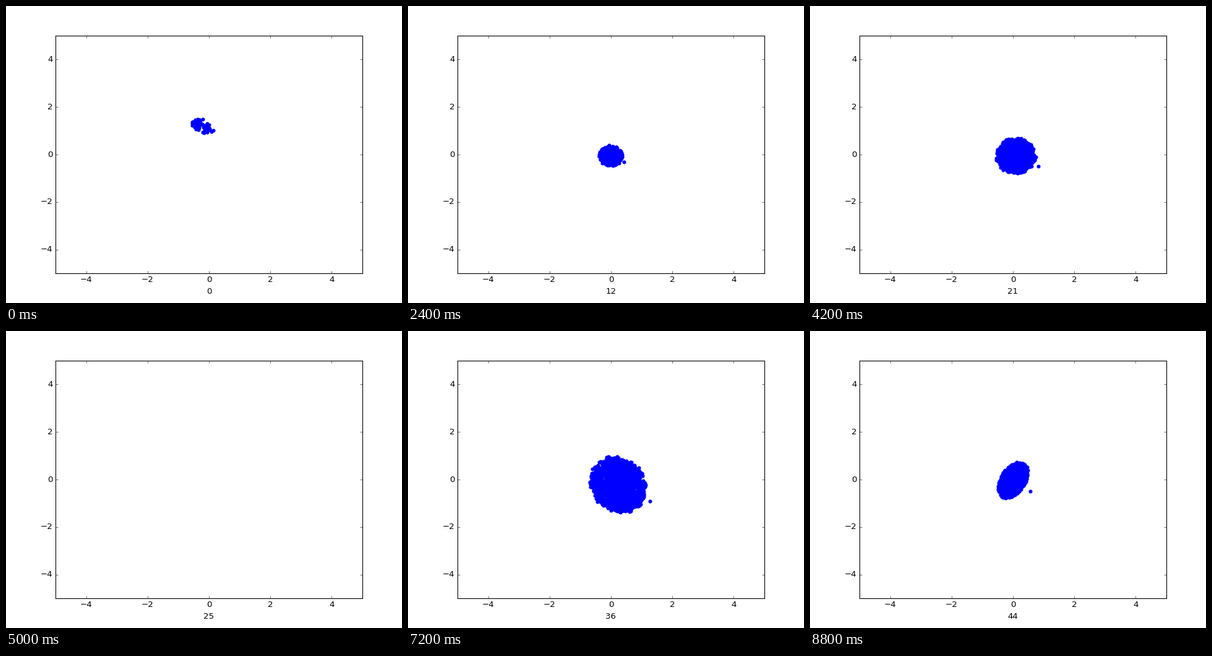
Recreate the animation shown at these times as a matplotlib script. Size 640 by 480 pixels, loop 9000 ms.

```python
import numpy as np
import matplotlib.pyplot as plt
from matplotlib.animation import FuncAnimation

FRAMES, STEP = 45, 200
BLANK = 25       # the plot is caught cleared here
RED_EVERY = 8    # the selected points show on every eighth frame
NONE = np.empty((0, 2))

# frame: centre x, centre y, radius x, radius y, tilt
KEYS = {
    0: (-0.25, 1.22, 0.34, 0.35, -0.5),
    7: (-0.08, -0.05, 0.33, 0.36, 0.0),
    18: (0.07, -0.06, 0.44, 0.49, 0.0),
    32: (0.11, 0.03, 0.49, 0.62, 0.0),
    39: (0.30, -0.40, 0.69, 0.89, -0.25),
    44: (0.00, -0.03, 0.48, 0.73, 0.42),
}


def pose(i):
    """Centre, radii and tilt, with a short swell every 14 frames."""
    cx, cy, rx, ry, tilt = (np.interp(i, list(KEYS), column)
                            for column in zip(*KEYS.values()))
    beat = max(0, np.cos(2 * np.pi * (i - 21) / 14)) ** 4
    swell = 1 + 0.02 * i * beat
    return cx, cy, rx * swell, ry * swell, tilt


def cloud(rng, count, cx, cy, rx, ry, tilt):
    """Random points filling a tilted ellipse with a ragged edge."""
    angle = rng.uniform(0, 2 * np.pi, count)
    radius = rng.random(count) ** 0.6 * rng.normal(1, 0.03, count)
    u, v = radius * np.cos(angle), radius * np.sin(angle)
    y = tilt * u + np.sqrt(1 - tilt ** 2) * v
    return np.column_stack([cx + rx * u, cy + ry * y])


plt.style.use("classic")
plt.rcParams["font.family"] = "DejaVu Sans"
fig = plt.figure(figsize=(8, 6), dpi=80, facecolor="white")
ax = fig.add_axes([0.125, 0.1, 0.775, 0.8])
ax.set(xlim=(-5, 5), ylim=(-5, 5),
       xticks=range(-4, 5, 2), yticks=range(-4, 5, 2))
blue, red = (ax.scatter([], [], s=20, c=color, edgecolors=color, linewidths=1)
             for color in ("blue", "red"))


def draw(i):
    rng = np.random.default_rng(100 + i)
    cx, cy, rx, ry, tilt = pose(i)
    count = 50 + 36 * i
    blues, reds = NONE, NONE
    if i != BLANK:
        straggler = (cx + 1.17 * rx, cy - 0.62 * ry)
        blues = np.vstack([cloud(rng, count, cx, cy, rx, ry, tilt), straggler])
        if i % RED_EVERY == RED_EVERY - 1:
            reds = cloud(rng, count // 2, cx + 0.05, cy + 0.3 * ry,
                         0.74 * rx, 0.6 * ry, tilt)
    blue.set_offsets(blues)
    red.set_offsets(reds)
    ax.set_xlabel(str(i))
    return blue, red


anim = FuncAnimation(fig, draw, frames=FRAMES, interval=STEP,
                     init_func=lambda: draw(0), repeat=True, repeat_delay=0)
plt.show()
```
